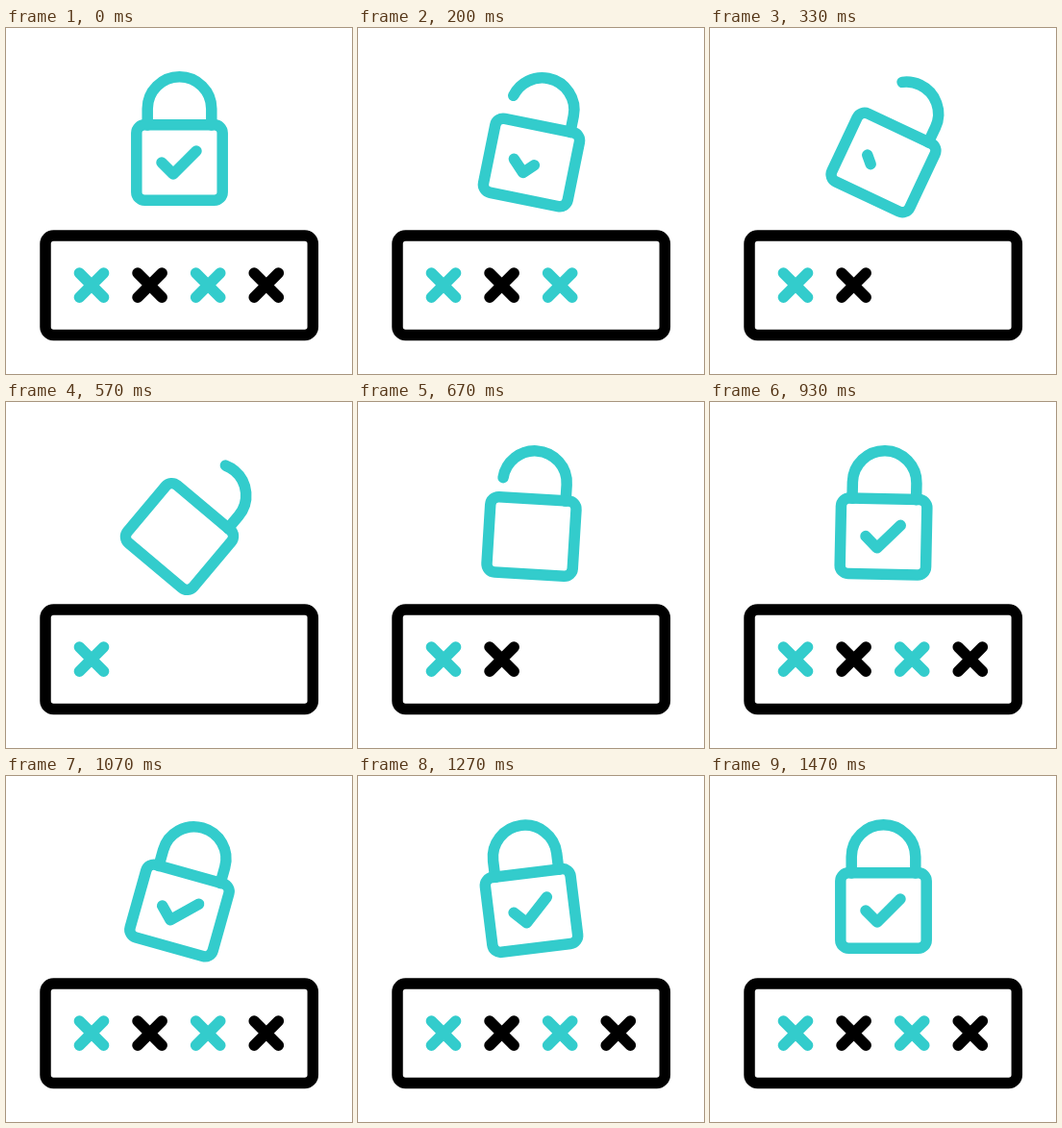
Animation, 360 px wide and 360 px high, one loop 1.67 s. Source, as an HTML page:

```html
<!DOCTYPE html>
<html lang="en">
<head>
<meta charset="utf-8">
<title>Password lock</title>
<style>
  html, body { margin: 0; width: 100%; height: 100%; overflow: hidden; background: #fff; }
  svg { display: block; width: 100vw; height: 100vh; }
  path, rect { fill: none; stroke-width: 11.5; stroke-linecap: round; stroke-linejoin: round; }
  .teal { stroke: #33cccc; }
  .black { stroke: #000; }
</style>
</head>
<body>
<svg viewBox="0 0 360 360">
  <rect class="black" x="41" y="216" width="278.3" height="103.5" rx="8.5"/>
  <g id="crosses"></g>
  <g id="lock" class="teal">
    <path id="shackle" pathLength="1" d="M147.2 101V84a33.3 33.3 0 0 1 66.6 0v17"/>
    <rect x="135.8" y="100.8" width="89.4" height="78.4" rx="8.5"/>
    <path id="check" pathLength="1" d="M162 140l12 12 24-24"/>
  </g>
  <g id="sparks" class="teal">
    <path pathLength="1" d="M110 83l-10-5"/>
    <path pathLength="1" d="M111 103l-12 1"/>
    <path pathLength="1" d="M110 127l-9 3"/>
  </g>
</svg>
<script>
const LOOP = 1670, LAST = 44;
const $ = id => document.getElementById(id);

// Keyframes are [step, value]; steps are 1/30 s apart.
const SWING = [[0, 0], [17, 40], [23, -33], [31, 17], [38, -7], [44, 0]];
const OPEN = [[0, 0], [13, 0.42], [17, 0.42], [22, 0]];
const CHECK = [[0, 1], [14, 0], [20, 0], [26, 1]];
const SPARK_HEAD = [[20, 0], [23, 1]];
const SPARK_TAIL = [[23, 0], [26, 1]];
// Steps between which each cross is hidden.
const HIDDEN = [null, [13, 20], [8, 23], [4, 26]];

const crosses = HIDDEN.map((_, i) => {
  const p = document.createElementNS("http://www.w3.org/2000/svg", "path");
  const x = 89 + 60.6 * i, y = 267.6, r = 12.6;
  p.setAttribute("d", `M${x - r} ${y - r}L${x + r} ${y + r}M${x + r} ${y - r}L${x - r} ${y + r}`);
  p.setAttribute("class", i % 2 ? "black" : "teal");
  return $("crosses").appendChild(p);
});

const ease = p => p * p * (3 - 2 * p);

function at(keys, s) {
  const i = keys.findIndex(k => k[0] > s);
  if (i === 0) return keys[0][1];
  if (i < 0) return keys[keys.length - 1][1];
  const [s0, a] = keys[i - 1], [s1, b] = keys[i];
  return a + (b - a) * ease((s - s0) / (s1 - s0));
}

const show = (el, on) => { el.style.visibility = on ? "visible" : "hidden"; };

function trim(el, from, to) {
  show(el, to - from > 0.01);
  const whole = from <= 0 && to >= 1;
  el.style.strokeDasharray = whole ? "none" : `${to - from} 2`;
  el.style.strokeDashoffset = -from;
}

function draw(s) {
  $("lock").setAttribute("transform", `rotate(${at(SWING, s)} 180.5 140)`);
  trim($("shackle"), at(OPEN, s), 1);
  trim($("check"), 0, at(CHECK, s));
  for (const el of $("sparks").children) trim(el, at(SPARK_TAIL, s), at(SPARK_HEAD, s));
  crosses.forEach((el, i) => {
    const h = HIDDEN[i];
    show(el, !h || s < h[0] || s >= h[1]);
  });
}

const start = performance.now();
function tick() {
  const t = (performance.now() - start) % LOOP;
  draw(Math.min(LAST, Math.floor((Math.floor(t / 10) + 0.5) * 0.3)));
  requestAnimationFrame(tick);
}
tick();
</script>
</body>
</html>
```
